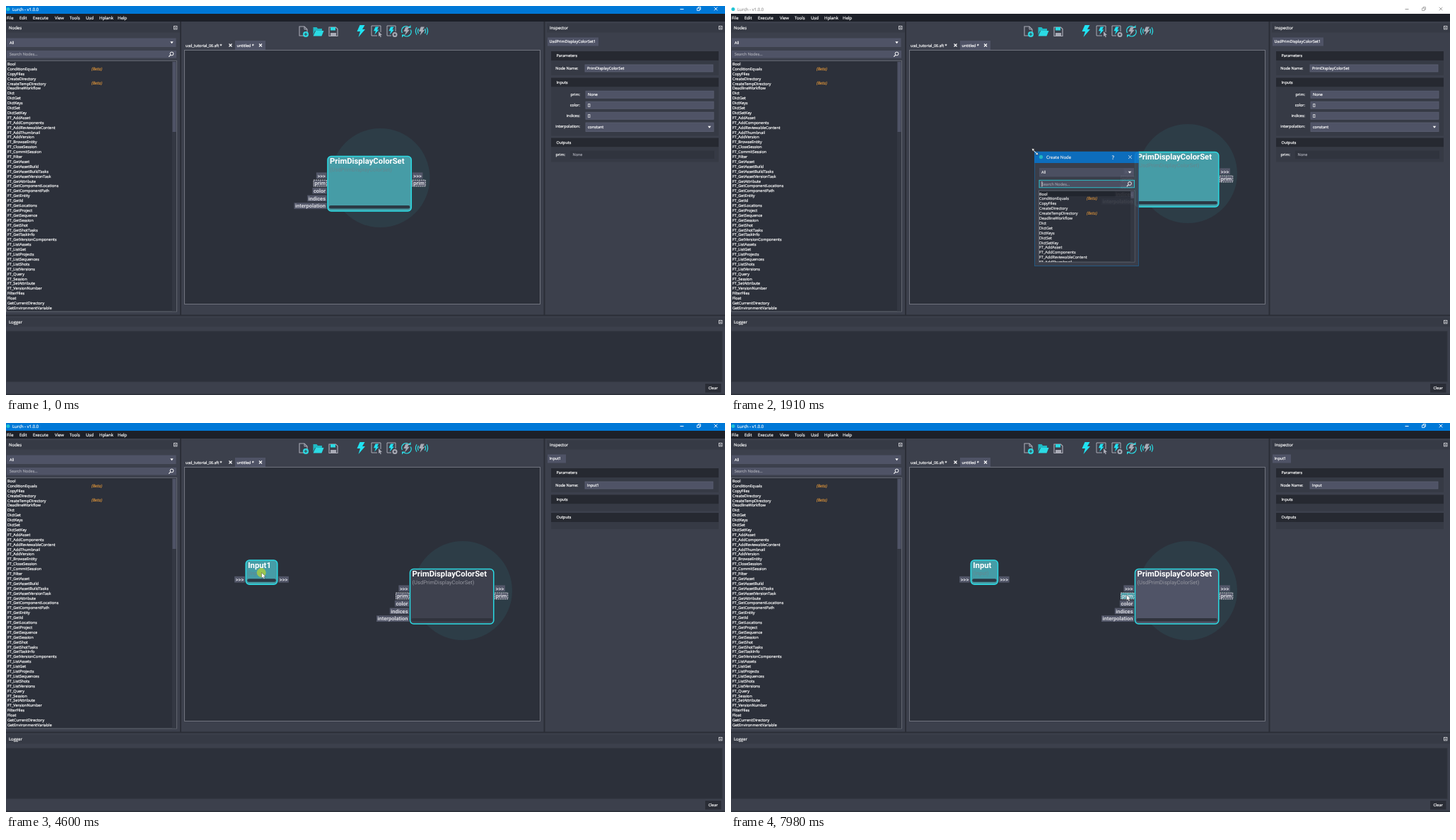
An HTML page that plays this animation: 1017 px wide and 550 px high, repeating every 8000 ms.

```html
<!DOCTYPE html>
<html lang="en">
<head>
<meta charset="utf-8">
<title>Node editor</title>
<style>
html, body { margin: 0; width: 100%; height: 100%; overflow: hidden; background: #3c404c; }
svg { display: block; width: 1017px; height: 550px; }
text { font-family: "Open Sans", "Noto Sans", sans-serif; text-rendering: geometricPrecision; white-space: pre; }
.node text { font-family: Roboto, sans-serif; }
</style>
</head>
<body>
<svg id="stage" viewBox="0 0 1017 550">
  <clipPath id="viewClip"><rect x="252.5" y="63" width="503" height="358.5"/></clipPath>
  <clipPath id="listClip"><rect x="436" y="261" width="135" height="101"/></clipPath>
  <g id="window"></g>
  <g id="titleBar"></g>
  <g id="graph" clip-path="url(#viewClip)"></g>
  <g id="inspector"></g>
  <g id="dialog"></g>
  <g id="pointer"></g>
</svg>
<script>
const LOOP = 8000;
const C = {
  panel: '#3c404c', dark: '#2a2d36', head: '#262931', view: '#2c303a', field: '#4f5366',
  line: '#6d707b', cyan: '#2bdbe4', teal: '#469ca6', blue: '#0078d7', body: '#363a45', ink: '#fff'
};
const PAN = [885, 1400], OPEN = 1810, TYPE_I = 2500, TYPE_N = 2620, PICK = 3160, CREATE = 3540,
  GRAB = 4150, DROP = 4710, EDIT = 5960, ERASE = 6160, COMMIT = 6800, RESELECT = 7420, HOVER = 7925;

// ---- drawing helpers ----
const rect = (x, y, w, h, fill, extra = '') =>
  `<rect x="${x}" y="${y}" width="${w}" height="${h}" fill="${fill}" ${extra}/>`;
const text = (x, y, s, fill = C.ink, size = 5.5, extra = '') =>
  `<text x="${x}" y="${y + size * 0.36}" font-size="${size}" fill="${fill}" ${extra}>${s}</text>`;
const uiText = (x, y, s, fill = C.ink, size = 5.5, extra = '') =>
  text(x, y, s, fill, size, `stroke="${fill}" stroke-width=".18" ${extra}`);
const path = (d, stroke, width = 1, fill = 'none') =>
  `<path d="${d}" stroke="${stroke}" stroke-width="${width}" fill="${fill}"/>`;
const dot = (x, y, r, fill, extra = '') => `<circle cx="${x}" cy="${y}" r="${r}" fill="${fill}" ${extra}/>`;
const cross = (x, y, r, stroke, w = 1) =>
  path(`M${x - r} ${y - r}l${2 * r} ${2 * r}m0 ${-2 * r}l${-2 * r} ${2 * r}`, stroke, w);
const arrow = (x, y) => path(`M${x - 2.2} ${y - 1.3}h4.4l-2.2 3z`, 'none', 0, '#fff');
const lens = (x, y) => dot(x, y, 2.4, 'none', 'stroke="#fff"') +
  path(`M${x - 1.8} ${y + 1.8}l-2.4 2.4`, '#fff', 1.2);
const bolt = (x, y, k, fill) =>
  `<path transform="translate(${x} ${y}) scale(${k})" d="M4 0h7L7.5 6h4L2 17l2.5-8H0z" fill="${fill}"/>`;

const pen = document.createElement('canvas').getContext('2d');
const portWidth = s => { pen.font = 'bold 7.5px Roboto, sans-serif'; return pen.measureText(s).width + 3; };

const shown = {};
function put(id, markup) {
  if (shown[id] === markup) return;
  shown[id] = markup;
  document.getElementById(id).innerHTML = markup;
}

// ---- node catalogue ----
const ft = ('AddAsset AddComponents AddReviewableContent AddThumbnail AddVersion BrowseEntity CloseSession ' +
  'CommitSession Filter GetAsset GetAssetBuild GetAssetBuildTasks GetAssetVersionTask GetAttribute ' +
  'GetComponentLocations GetComponentPath GetEntity GetId GetLocations GetProject GetSequence GetSession ' +
  'GetShot GetShotTasks GetTaskInfo GetVersionComponents ListAssets ListGet ListProjects ListSequences ' +
  'ListShots ListVersions Query Session SetAttribute VersionNumber').split(' ').map(s => 'FT_' + s);
const catalogue = [
  ...('Bool ConditionEquals CopyFiles CreateDirectory CreateTempDirectory DeadlineWorkflow ' +
    'Dict DictGet DictKeys DictSet DictSetKey').split(' '),
  ...ft,
  ...('FilterFiles Float GetCurrentDirectory GetEnvironmentVariable Input Integer JoinPath JsonStringRead ' +
    'JsonWriteString ListInsert OTIO_TimelineExport OTIO_TimelineOpen OTIO_TimelineTracksGet Print ' +
    'ReadFileLines String StringConstraints').split(' ')
];
const ROW = 6.9;

function search(query) {
  const starts = [], contains = [];
  for (const name of catalogue) {
    const at = name.toLowerCase().indexOf(query);
    if (at === 0) starts.push(name);
    else if (at > 0) contains.push(name);
  }
  return starts.concat(contains);
}
const rows = (names, x, y, betaX) => names.map((name, i) =>
  uiText(x, y + i * ROW, name) +
  (/^(ConditionEquals|CreateTempDirectory)$/.test(name)
    ? uiText(betaX, y - 0.3 + i * ROW, '(Beta)', '#d8913a', 5.8, 'font-style="italic"') : '')).join('');

// ---- fixed window parts ----
function dock(x, y, w, title, buttonX) {
  return rect(x, y, w, 13, C.body) + uiText(x + 4, y + 6.7, title, C.ink, 6) +
    rect(buttonX - 2, y + 4, 4.4, 4.4, 'none', 'stroke="#d5d6da" stroke-width=".9"') +
    rect(buttonX - 0.6, y + 5.6, 1.6, 1.5, '#d5d6da');
}

function toolbar() {
  const grey = '#a9abb6';
  return path('M415 29h7l4 4v9h-11z', grey, 1.1) + path('M422 29v4h4', grey) +
    dot(424, 40, 4, C.cyan) + path('M421.7 40h4.6m-2.3-2.3v4.6', C.panel, 1.1) +
    path('M434.5 41v-11h5l1.5 2h6v3h-10z', 'none', 0, '#1fb9c4') +
    path('M438 35h11.5l-3 7.5h-12z', 'none', 0, C.cyan) +
    path('M457 30h9.5l2.5 2.5v10h-12z', grey, 1.2) + rect(459, 30, 7, 4.5, C.cyan) + rect(459, 38, 8, 4, grey) +
    bolt(496.5, 27, 1, '#20e2f2') +
    path('M530 37v-9h-13v14h8', grey) + bolt(520, 29.5, 0.65, '#20e2f2') +
    path('M527 36l5 5-2.2.2 1 2.6-1.2.5-1-2.6-1.6 1.4z', 'none', 0, grey) +
    path('M551 36v-8h-12v14h6', grey) + bolt(541.5, 29.5, 0.65, '#20e2f2') +
    dot(550, 40.5, 3.5, grey) + rect(548.7, 39.2, 2.6, 2.6, C.panel) +
    path('M560.5 38a6.3 6.3 0 0 1 10-7.5m1.8 3a6.3 6.3 0 0 1-10 7.5', C.cyan, 1.4) +
    path('M568.5 31h4v-4zM564 40.5h-4v4z', 'none', 0, C.cyan) + bolt(562.5, 29.5, 0.72, grey) +
    bolt(584, 29.5, 0.72, grey) +
    [4.5, 7].map(r => path(`M${588 - r} ${35.5 - r * 0.75}q${-r * 0.45} ${r * 0.75} 0 ${r * 1.5}` +
      `M${588 + r} ${35.5 - r * 0.75}q${r * 0.45} ${r * 0.75} 0 ${r * 1.5}`, C.cyan, 1.2)).join('');
}

function windowMarkup() {
  const menu = [['File', 1], ['Edit', 19], ['Execute', 38], ['View', 69], ['Tools', 90],
    ['Usd', 113], ['Hplank', 132], ['Help', 158]];
  return rect(0, 0, 1017, 550, C.panel) + rect(0, 11, 1017, 11, '#1d2028') +
    menu.map(([s, x]) => uiText(x, 16.5, s, C.ink, 6)).join('') +
    rect(246, 22, 2, 415, '#2b2e37') + rect(760.5, 22, 2, 415, '#2b2e37') + rect(0, 436.5, 1017, 2, '#2b2e37') +
    dock(0, 24.5, 246, 'Nodes', 239.5) + dock(765, 24.5, 252, 'Inspector', 1010.5) +
    dock(0, 440.5, 1017, 'Logger', 1010.5) +
    rect(1, 45.5, 239.5, 12.5, C.field) + uiText(5, 52, 'All') + arrow(234.5, 51.5) +
    rect(1, 63, 240, 10.5, C.field) + uiText(5, 68.5, 'Search Nodes...', '#a4a6b0') + lens(234.5, 67.5) +
    rect(0.5, 77.5, 241, 354.5, C.view, `stroke="${C.line}" stroke-width=".8"`) +
    rect(235, 78, 6, 353.5, '#343843') + rect(235.5, 79, 5, 99, C.field) +
    rows(catalogue.slice(0, 51), 2, 82, 121) +
    toolbar() +
    rect(324, 49, 43, 13.5, C.field) + uiText(254, 55.7, 'usd_tutorial_06.sft *') + uiText(326.5, 55.7, 'untitled *') +
    cross(317.5, 55.5, 2, '#fff', 1.1) + cross(360, 55.5, 2, '#fff', 1.1) +
    rect(252.5, 62.5, 503, 359, C.view, 'stroke="#777a85" stroke-width=".9"') +
    rect(1, 460, 1012, 71, C.view, 'stroke="#31343e"') +
    rect(989, 534, 22.5, 12.5, C.dark) + uiText(993.5, 540.5, 'Clear') + rect(0, 548.5, 1017, 1.5, '#2b2e37');
}

function titleMarkup(active) {
  const ink = active ? '#fff' : '#9a9a9a';
  return rect(0, 0, 1017, 11, active ? C.blue : '#fff') + dot(3, 4.5, 2.5, '#20c4d4') +
    uiText(9, 4.7, 'Lurch - v1.0.0', ink, 6) +
    path('M953.5 4.5h5', ink) + path('M977.5 3h3.5v3.5h-3.5zM979 3v-1.5h3.5v3.5h-1.5', ink, 0.8) +
    cross(1004, 4, 2.3, ink, 0.9);
}

// ---- graph ----
function port(name, x, y, side, hot) {
  const w = portWidth(name), left = side < 0 ? x - w : x;
  const dashed = name === 'prim' ? 'stroke="#e8e8ec" stroke-width=".9" stroke-dasharray="2 1"' : '';
  return rect(left, y - 4.4, w, 8.8, hot ? C.teal : '#535769', dashed) +
    text(left + 1.5, y, name, '#d9dae0', 7.5, 'font-weight="bold"');
}

function node(n) {
  const { x, y, w, h } = n;
  const fill = n.selected ? C.teal : n.hover ? '#505467' : '#3e414e';
  return rect(x, y, w, h, fill, `rx="5" stroke="${C.cyan}" stroke-width="1.5"`) +
    text(x + 3, y + 6.8, n.title, '#fff', 11.3, 'font-weight="bold"') +
    text(x + 3, y + 18.5, n.type, n.selected ? '#64868f' : '#94969f', 7.6) +
    rect(x + 2, y + h - 8, w - 4, 4.5, n.selected ? '#2b3944' : '#30333d', 'rx="2"') +
    n.inputs.map((s, i) => port(s, x - 1.5, y + n.portY + i * 10.7, -1, n.hotPort === s)).join('') +
    n.outputs.map((s, i) => port(s, x + w + 1.5, y + n.portY + i * 10.7, 1)).join('');
}

function graphMarkup(t) {
  const pan = ease(t, PAN[0], PAN[1]), px = 116.5 * pan, py = -6 * pan;
  const drag = ease(t, GRAB, 4570), renamed = t >= COMMIT;
  let out = dot(529.5 + px, 243 + py, 70, '#2d3d47') + node({
    x: 455 + px, y: 212.5 + py, w: 118.3, h: 77.5, portY: 27.3,
    title: 'PrimDisplayColorSet', type: '(UsdPrimDisplayColorSet)',
    selected: t < CREATE, hover: t >= HOVER, hotPort: t >= HOVER ? 'prim' : '',
    inputs: ['>>>', 'prim', 'color', 'indices', 'interpolation'], outputs: ['>>>', 'prim']
  });
  if (t >= CREATE) out += node({
    x: 407.3 - 68 * drag, y: 188.6 + 5.5 * drag, w: renamed ? 38.2 : 44.5, h: 34.2, portY: 27.1,
    title: renamed ? 'Input' : 'Input1', type: '(Input)',
    selected: t < COMMIT || t >= RESELECT, inputs: ['>>>'], outputs: ['>>>']
  });
  return `<g class="node">${out}</g>`;
}

// ---- inspector ----
const section = (y, title, h) =>
  rect(771, y, 237, 13, C.head) + uiText(778.5, y + 6.5, title) + rect(771, y + 13, 237, h, C.body);
const label = (x, y, s) => uiText(x, y, s, C.ink, 5.5, 'text-anchor="end"');
const field = (x, y, w, h, s, border = '#5b5f72') =>
  rect(x, y, w, h, C.field, `stroke="${border}" stroke-width=".8"`) + uiText(x + 3, y + h / 2, s);

function inspectorMarkup(t) {
  if (t >= COMMIT && t < RESELECT) return '';
  const prim = t < CREATE;
  const tab = prim ? 'UsdPrimDisplayColorSet1' : 'Input1';
  const name = prim ? 'PrimDisplayColorSet' : t < ERASE ? 'Input1' : 'Input';
  const editing = t >= EDIT && t < COMMIT;
  const head = rect(766, 44.5, prim ? 72 : 26, 12, C.field) + uiText(768.5, 50.5, tab) +
    section(64, 'Parameters', 21) + label(809.5, 88.3, 'Node Name:') +
    field(819, 83, 181, 10, name, editing ? C.cyan : undefined);
  if (!prim) return head + section(101.5, 'Inputs', 10) + section(127, 'Outputs', 10);
  return head + section(101.5, 'Inputs', 69) +
    [['prim:', 'None'], ['color:', '[]'], ['indices:', '[]']].map(([k, v], i) =>
      label(812, 125.3 + i * 15, k) + field(820, 120.2 + i * 15, 181, 10, v)).join('') +
    label(812, 170.5, 'interpolation:') + field(820, 165, 181, 12.5, 'constant') + arrow(995, 171) +
    section(186.5, 'Outputs', 21) + label(791, 210.5, 'prim:') +
    rect(798, 204.5, 204, 11.5, '#30343e') + uiText(801.5, 210.5, 'None', '#a4a6b0');
}

// ---- create dialog ----
function dialogMarkup(t) {
  const closing = t >= CREATE;
  const opacity = closing ? 0.91 * (3710 - t) / 170 : Math.min(1, (t - OPEN) / 112);
  if (t < OPEN || opacity <= 0) return '';
  const query = t < TYPE_I ? '' : t < TYPE_N ? 'i' : 'in';
  const names = search(query), picked = t >= PICK;
  const handle = query === 'in' ? 55 : query ? 18 : 10;
  const caretX = 440 + (query ? [0, 1.5, 5][query.length] : -0.5);
  const caret = !picked && (t < 2340 || t >= TYPE_I);
  return `<g opacity="${opacity.toFixed(2)}">` +
    rect(429.5, 206, 147, 161.5, C.panel, 'stroke="#24608f" stroke-width=".9"') + rect(429, 206, 148, 16, '#0a74cb') +
    dot(438.5, 213.5, 2.7, '#20c4d4') + uiText(446, 213.8, 'Create Node', '#fff', 6) +
    (closing ? '' : uiText(538.8, 213.8, '?', '#fff', 7.5) + cross(564.5, 213.6, 2.3, '#fff', 0.9)) +
    rect(436, 229, 134, 12.5, C.field) + uiText(439, 235.5, 'All') + arrow(564, 235) +
    rect(436, 246.3, 134.5, 10.5, C.field, picked ? '' : `stroke="${C.cyan}" stroke-width=".9"`) +
    uiText(439.5, 251.8, query || 'Search Nodes...', query ? C.ink : '#a4a6b0') +
    (caret ? rect(caretX, 248, 0.8, 7.5, '#fff') : '') + lens(564, 251) +
    rect(435.5, 261, 135.5, 101, C.view, `stroke="${C.line}" stroke-width=".8"`) +
    `<g clip-path="url(#listClip)">` + rect(436, 262, 129, 6.9, picked ? C.teal : '#22252d') +
    rows(names.slice(0, 15), 436, 265.6, 503) + `</g>` +
    rect(565, 261.5, 5.5, 100, '#343843') + rect(565.5, 262, 4.5, handle, C.field) + `</g>`;
}

// ---- pointer: [start, end, x, y] moves, starting from the top edge ----
const moves = [
  [370, 800, 505.5, 178], [PAN[0], PAN[1], 622, 172], [1420, 1790, 429.5, 206], [GRAB, 4570, 361.5, 211.5],
  [4930, 5980, 848, 88], [6370, 6930, 405.5, 210], [7000, 7330, 353, 212], [7500, 7950, 559.5, 243]
];

function ease(t, from, to) {
  const u = Math.min(1, Math.max(0, (t - from) / (to - from)));
  return u * u * (3 - 2 * u);
}
function pointerAt(t) {
  let x = 512, y = -14;
  for (const [from, to, tx, ty] of moves) {
    const k = ease(t, from, to);
    x += (tx - x) * k;
    y += (ty - y) * k;
  }
  return [x, y];
}

function pointerMarkup(t) {
  const [x, y] = pointerAt(t);
  const within = (a, b) => t >= a && t < b;
  const place = s => `<g transform="translate(${x.toFixed(2)} ${y.toFixed(2)})">${s}</g>`;
  if (within(PAN[0], PAN[1])) return place(dot(0.5, -2, 6.3, '#3aa9b2') +
    path('M-3 0q0-3 1.5-3q1-1.5 2 0q1-1 2 .3q1.5 0 1.5 2v2q-1 3-3.5 3t-3.5-4z', 'none', 0, '#eefcfc'));
  if (within(OPEN, CREATE)) return place(path('M-3-3l7 6.5', '#fff', 1) +
    path('M-4-4.5l4 .7-3 3zM5 4.5l-4-.7 3-3z', '#111', 0.4, '#fff'));
  if (x > 819 && y < 94 && within(5000, COMMIT))
    return place(path('M-2-4.5h1.5l.5.5.5-.5h1.5M0-4v8.5M-2 5h1.5l.5-.5.5.5h1.5', '#fff', 0.9));
  const pressed = within(GRAB, DROP) || within(6760, 6850) || within(RESELECT, 7500);
  return place((pressed ? dot(-0.3, 0, 6.5, '#b4d435', 'opacity=".75"') : '') +
    path('M0 0v8l1.9-1.7 1.3 2.8 1.4-.6-1.3-2.8h2.5z', '#222', 0.4, '#fff'));
}

// ---- playback ----
put('window', windowMarkup());
const started = performance.now();
function draw() {
  const t = (performance.now() - started) % LOOP;
  put('titleBar', titleMarkup(t < OPEN || t >= CREATE));
  put('graph', graphMarkup(t));
  put('inspector', inspectorMarkup(t));
  put('dialog', dialogMarkup(t));
  put('pointer', pointerMarkup(t));
  requestAnimationFrame(draw);
}
draw();
</script>
</body>
</html>
```
